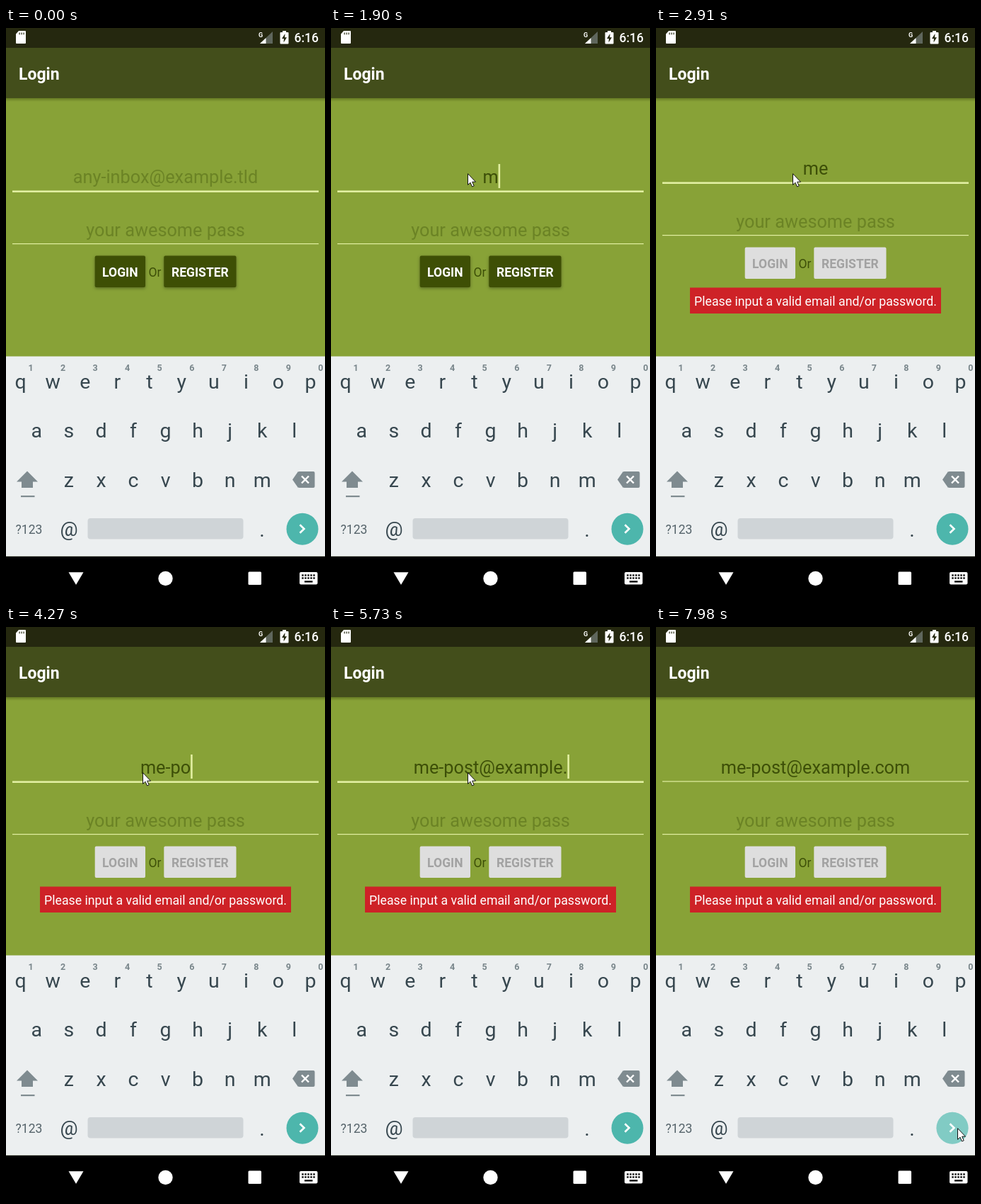
Animation, 451 px wide and 806 px high, one loop 8000 ms. Source, as an HTML page with a canvas:

```html
<!DOCTYPE html>
<html lang="en">
<head>
<meta charset="utf-8">
<title>Login form</title>
<style>
html, body { margin: 0; width: 100%; height: 100%; overflow: hidden; background: #88a237; }
canvas { display: block; width: 451px; height: 806px; }
</style>
</head>
<body>
<canvas id="stage" width="451" height="806"></canvas>
<script>
const ctx = document.getElementById('stage').getContext('2d');
const LOOP = 8000, W = 451, H = 806, MID = W / 2;
const DP = W / 360;
const BAR_TOP = 28, BAR_BOTTOM = 99, KEYS_TOP = 463.5, NAV_TOP = H - 48 * DP;
const SMALL = 14 * DP, TITLE = 18 * DP, FIELD = 25.3;
const KEY_STEP = 45.55, ROW_STEP = 69.7;
const BLINK = 500, CARET_START = 395, SHIFT_TIME = 1960, BLUR_TIME = 7920;
const GREEN = '#88a237', DARK = '#25280f', ACCENT = '#e2efa2', INK = '#3d4f08', HINT = '#6b8325';
const KEYS = '#eceff0', KEY = '#37474f', KEY_SOFT = '#7f8b90';

const EMAIL_HINT = 'any-inbox@example.tld';

// Typing bursts: letters, time of the first, time of the last
const BURSTS = [
  ['me', 1900, 2400], ['-', 3290, 3290], ['post', 4150, 4470],
  ['@e', 4640, 4790], ['xample', 5040, 5430], ['.com', 5730, 6010]
];

// Pointer: start time and place, then moves as start, duration, goal x, goal y
const ENTRY = { time: 80, x: 345, y: 796 };
const MOVES = [[80, 470, 188, 214], [685, 55, 193, 205], [7100, 300, 441, 603], [7545, 195, 426, 707]];

const span = (t, a, length) => Math.max(0, Math.min(1, (t - a) / length));
const smooth = p => p * p * (3 - 2 * p);
const easeOut = p => 1 - (1 - p) ** 2;
const mix = (a, b, p) => a + (b - a) * p;

function rect(x, y, w, h, color) {
  ctx.fillStyle = color;
  ctx.fillRect(x, y, w, h);
}

function round(x, y, w, h, r, color) {
  ctx.fillStyle = color;
  ctx.beginPath();
  ctx.roundRect(x, y, w, h, r);
  ctx.fill();
}

function disc(x, y, r, color) {
  ctx.fillStyle = color;
  ctx.beginPath();
  ctx.arc(x, y, r, 0, Math.PI * 2);
  ctx.fill();
}

function trace(points) {
  ctx.beginPath();
  points.forEach(([x, y]) => ctx.lineTo(x, y));
}

function poly(points, color) {
  trace(points);
  ctx.fillStyle = color;
  ctx.fill();
}

function stroke(points, color, width) {
  trace(points);
  ctx.strokeStyle = color;
  ctx.lineWidth = width;
  ctx.stroke();
}

function text(str, x, y, size, color, weight = 400, align = 'center') {
  ctx.font = `${weight} ${size}px Roboto, sans-serif`;
  ctx.textAlign = align;
  ctx.fillStyle = color;
  ctx.fillText(str, x, y);
}

function drawStatus() {
  rect(0, 0, W, BAR_TOP, DARK);

  // Memory card with a cut corner
  round(14, 4, 14, 18, 1, '#fff');
  poly([[14, 4], [18, 4], [14, 8.5]], DARK);
  for (let x = 18.5; x < 26; x += 3) rect(x, 6.5, 1.2, 2.8, DARK);

  // Signal: a filled corner inside a larger triangle
  const corner = (size, color) => poly([[359, 22], [359 + size, 22], [359 + size, 22 - size * 0.94]], color);
  corner(18, '#5f665c');
  corner(8.5, '#fff');
  text('G', 360, 12.5, 9, '#fff', 700);

  // Battery
  rect(391, 4, 5, 3, '#fff');
  round(387.5, 6, 12, 16.5, 1, '#fff');
  poly([[394.5, 8], [390, 15], [394, 15]], DARK);
  poly([[392.5, 20.5], [397, 13.2], [393, 13.2]], DARK);
  text('6:16', 442, 20, SMALL, '#fff', 500, 'right');
}

function drawTitle() {
  rect(0, BAR_TOP, W, BAR_BOTTOM - BAR_TOP, '#434e1b');
  const shade = ctx.createLinearGradient(0, BAR_BOTTOM, 0, BAR_BOTTOM + 5);
  shade.addColorStop(0, 'rgba(40,50,0,0.35)');
  shade.addColorStop(1, 'rgba(40,50,0,0)');
  rect(0, BAR_BOTTOM, W, 5, shade);
  text('Login', 18, 73, TITLE * 1.02, '#fff', 700, 'left');
}

// Text typed so far and the time of its last letter
function typing(t) {
  let typed = '', last = CARET_START;
  for (const [letters, first, end] of BURSTS) {
    [...letters].forEach((c, i) => {
      const at = mix(first, end, i / Math.max(1, letters.length - 1));
      if (at <= t) {
        typed += c;
        last = at;
      }
    });
  }
  return { typed, last };
}

function drawButton(label, x, y, w, off) {
  ctx.save();
  if (!off) {
    ctx.shadowColor = 'rgba(0,0,0,0.35)';
    ctx.shadowBlur = 4;
    ctx.shadowOffsetY = 1.5;
  }
  round(x, y, w, 44.4, 2, off ? '#dedede' : '#3e4f05');
  ctx.restore();
  text(label, x + w / 2, y + 28.9, SMALL, off ? '#a2a2a2' : '#fff', 700);
}

function drawForm(t) {
  const off = t >= SHIFT_TIME;
  const focused = t < BLUR_TIME;
  const { typed, last } = typing(t);

  ctx.save();
  ctx.translate(0, off ? -12 : 0);
  text(typed || EMAIL_HINT, MID, 219, FIELD, typed ? INK : HINT);
  const half = typed ? ctx.measureText(typed).width / 2 : 0;
  rect(9, 229.4, 433, focused ? 2.6 : 1.2, ACCENT);
  if (focused && t >= last && Math.floor((t - last) / BLINK) % 2 === 0) {
    rect(MID + half, 192, 2.6, 34, ACCENT);
  }

  text('your awesome pass', MID, 294, FIELD, HINT);
  rect(9, 304, 433, 1.2, ACCENT);

  drawButton('LOGIN', 125.7, 321.6, 71.3, off);
  text('Or', 210.5, 350.5, SMALL, INK);
  drawButton('REGISTER', 223.3, 321.6, 102.2, off);
  ctx.restore();

  ctx.globalAlpha = easeOut(span(t, 2150, 490));
  rect(48, 366.5, 355, 36.5, '#ce2227');
  text('Please input a valid email and/or password.', MID, 391.5, SMALL * 1.01, '#fff');
  ctx.globalAlpha = 1;
}

function drawKeyboard(t) {
  rect(0, KEYS_TOP, W, NAV_TOP - KEYS_TOP, KEYS);
  ['qwertyuiop', 'asdfghjkl', 'zxcvbnm'].forEach((row, r) => {
    const x = 20.6 + r * KEY_STEP / 2 + (r === 2 ? KEY_STEP / 2 : 0);
    [...row].forEach((c, i) => text(c, x + i * KEY_STEP, 508.5 + r * ROW_STEP, 28.5, KEY));
  });
  for (let i = 0; i < 10; i++) text((i + 1) % 10, 35 + i * KEY_STEP, 484, 12.5, '#78858a', 700);

  // Shift
  poly([[30, 625.5], [45, 640.5], [15, 640.5]], KEY_SOFT);
  rect(22, 640, 16, 9, KEY_SOFT);
  rect(21, 660, 19.5, 2.2, KEY_SOFT);

  // Backspace
  poly([[405, 637.5], [413, 626], [413, 649]], KEY_SOFT);
  round(412.5, 626, 24, 23, 2, KEY_SOFT);
  for (const s of [-5, 5]) stroke([[423 - s, 632.5], [423 + s, 642.5]], '#fff', 2.4);

  text('?123', 32.5, 714, SMALL, '#56646b');
  text('@', 89, 717, 28, KEY);
  round(115.5, 692, 220, 29.5, 4, '#cfd4d7');
  text('.', 362, 718, 28.5, KEY);

  // Enter, lighter while pressed
  disc(419, 707.2, 22.5, '#4db6ac');
  disc(419, 707.2, 22.5, `rgba(255,255,255,${0.29 * span(t, 7800, 90)})`);
  stroke([[415.5, 701.2], [421.5, 707], [415.5, 712.8]], '#fff', 2.6);
}

function drawNav() {
  rect(0, NAV_TOP, W, H - NAV_TOP, '#000');
  poly([[88.5, 768.3], [109.5, 768.3], [99, 786]], '#fff');
  disc(MID, 777, 10.2, '#fff');
  round(342.5, 767.5, 18.5, 18.5, 1.5, '#fff');
  round(415, 768, 25.5, 17.5, 2, '#fff');
  for (let i = 0; i < 10; i++) {
    rect(418.3 + i % 5 * 4, 771.3 + Math.floor(i / 5) * 4, 2.4, 2.4, '#000');
  }
  rect(422, 780.3, 11.5, 2.3, '#000');
}

function drawPointer(t) {
  if (t < ENTRY.time) return;
  let { x, y } = ENTRY;
  for (const [start, length, goalX, goalY] of MOVES) {
    const p = smooth(span(t, start, length));
    x = mix(x, goalX, p);
    y = mix(y, goalY, p);
  }
  ctx.save();
  ctx.translate(x + 0.5, y + 0.7);
  trace([[0, 0], [0, 15.7], [3.5, 12.5], [6, 18.3], [8.7, 17.2], [6.2, 11.5], [11, 11.5]]);
  ctx.closePath();
  ctx.fillStyle = '#fff';
  ctx.fill();
  ctx.strokeStyle = '#111';
  ctx.lineWidth = 1;
  ctx.stroke();
  ctx.restore();
}

function draw(t) {
  rect(0, 0, W, H, GREEN);
  drawStatus();
  drawTitle();
  drawForm(t);
  drawKeyboard(t);
  drawNav();
  drawPointer(t);
}

const start = performance.now();
function tick() {
  draw((performance.now() - start) % LOOP);
  requestAnimationFrame(tick);
}
tick();
</script>
</body>
</html>
```
